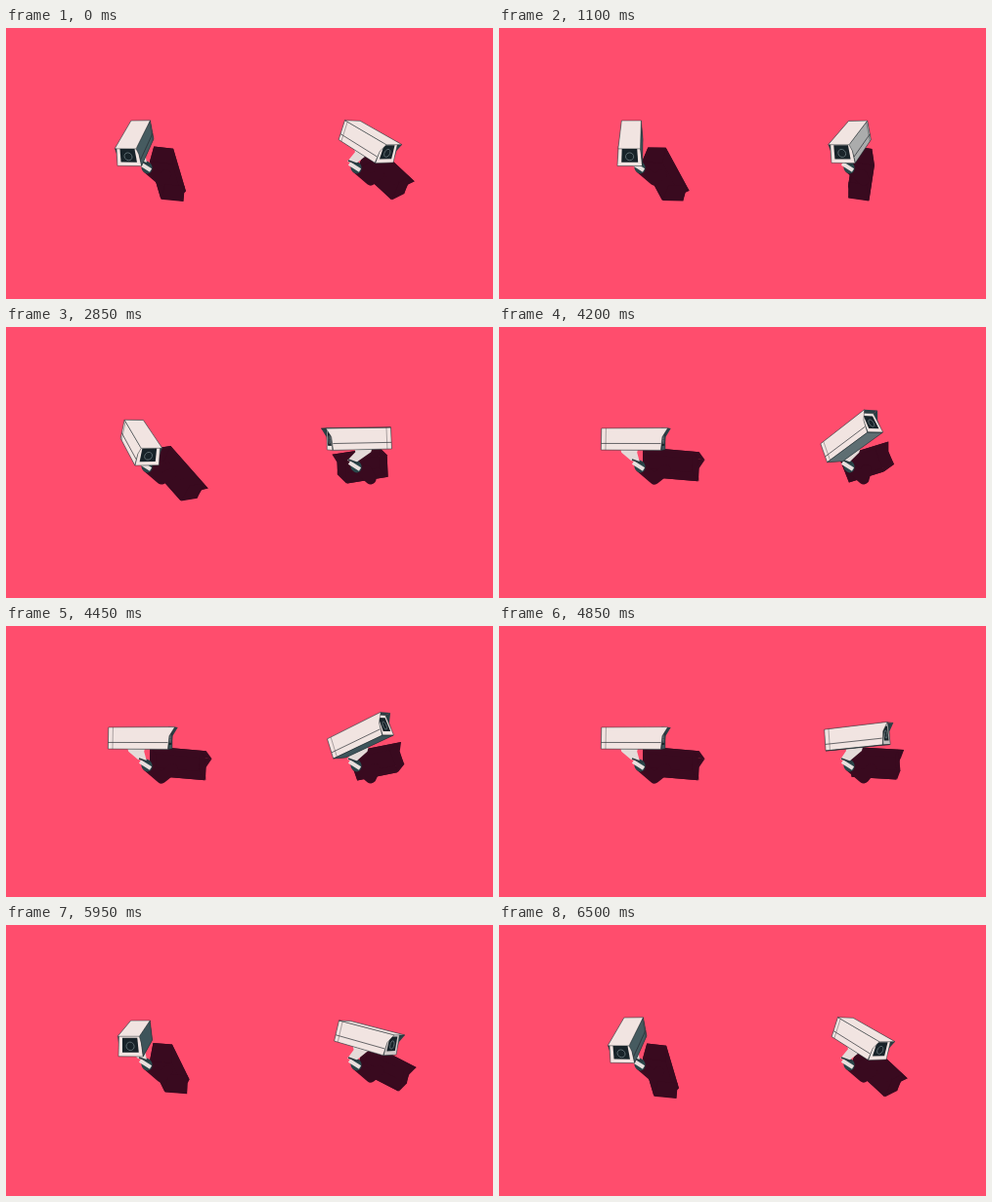
These frames come from a looping animation (498x278 px, 6550 ms). An HTML page with a canvas:

```html
<!DOCTYPE html>
<html>
<head>
<meta charset="utf-8">
<style>
html, body { margin: 0; height: 100%; overflow: hidden; background: #ff4d6d; }
canvas { display: block; }
</style>
</head>
<body>
<canvas id="stage" width="498" height="278"></canvas>
<script>
const ctx = document.getElementById('stage').getContext('2d');
const LOOP = 6550;
const HALF = { f: 34, r: 12.3, d: 11 };   // half length, width, height

// keys: time, centre x, centre y, yaw (+ right), pitch (+ down), in degrees
const cameras = [
  {
    base: [143, 143], sun: [0.54, 0.45],
    keys: [
      [0, 131.5, 118.5, -14.5, 26], [1100, 134.5, 118.5, -2, 26],
      [2850, 138, 119, 17, 26], [4200, 140.5, 115, 78, 0],
      [4850, 140.5, 115, 78, 0], [5400, 134, 114, 0, 2],
      [6500, 131.5, 118.5, -14.5, 26]
    ]
  },
  {
    base: [357, 143], sun: [0.19, 0.47],
    keys: [
      [0, 372, 117, 42, 22], [1100, 359, 117, -18, 22],
      [2850, 358, 114.5, -74, 1], [4200, 361.5, 112.5, 50, -30],
      [4850, 369, 113.5, 70, -6], [5400, 370.5, 114.5, 72, 0],
      [6500, 372, 117, 42, 22]
    ]
  }
];

// Monotone cubic through the keys
function poseAt(keys, time) {
  const last = keys.length - 1;
  if (time >= keys[last][0]) return keys[last].slice(1);
  const i = keys.findIndex(k => k[0] > time) - 1;
  const [a, b] = [keys[i], keys[i + 1]];
  const span = b[0] - a[0], u = (time - a[0]) / span;
  return [1, 2, 3, 4].map(c => {
    const slope = j => j < 0 || j >= last ? 0
      : (keys[j + 1][c] - keys[j][c]) / (keys[j + 1][0] - keys[j][0]);
    const tangent = j => {
      const p = slope(j - 1), q = slope(j);
      return p * q > 0 ? 2 * p * q / (p + q) : 0;
    };
    const ease = u * u * (3 - 2 * u);
    return a[c] + (b[c] - a[c]) * ease
      + span * (tangent(i) * u * (1 - u) ** 2 - tangent(i + 1) * u * u * (1 - u));
  });
}

function trace(points, closed = true) {
  ctx.beginPath();
  points.forEach(([x, y]) => ctx.lineTo(x, y));
  if (closed) ctx.closePath();
}

function fill(points, color, edge) {
  trace(points);
  ctx.fillStyle = color;
  ctx.fill();
  if (edge) line(points, edge, 0.8, true);
}

function line(points, color, width, closed = false) {
  trace(points, closed);
  ctx.strokeStyle = color;
  ctx.lineWidth = width;
  ctx.stroke();
}

function shade(light) {
  const t = Math.min(1, Math.max(0, (light + 0.25) / 0.6));
  const mix = (dark, bright) => Math.round(dark + (bright - dark) * t);
  return `rgb(${mix(62, 241)},${mix(84, 228)},${mix(90, 225)})`;
}

// Face outlines in box units: [along axis, across, down]
const side = r => [[-1, r, -1], [1, r, -1], [0.84, r, -0.2], [0.8, r, 1], [-1, r, 1]];
const slab = (d, front) => [[-1, -1, d], [front, -1, d], [front, 1, d], [-1, 1, d]];
const panel = (f, r, top, bottom) => [[f, -r, top], [f, r, top], [f, r, bottom], [f, -r, bottom]];
const ring = Array.from({ length: 16 }, (_, i) =>
  [0.82, 0.34 * Math.cos(i * Math.PI / 8), 0.05 + 0.38 * Math.sin(i * Math.PI / 8)]);

function drawCamera({ base, sun, keys }, time) {
  const [cx, cy, yawDeg, pitchDeg] = poseAt(keys, time);
  const yaw = yawDeg * Math.PI / 180, pitch = pitchDeg * Math.PI / 180;
  const [sa, ca, sp, cp] = [Math.sin(yaw), Math.cos(yaw), Math.sin(pitch), Math.cos(pitch)];
  const F = [sa * cp, sp, ca * cp], R = [ca, 0, -sa], D = [-sa * sp, cp, -ca * sp];
  const gap = 54 + 8 * F[2];   // distance from the wall; the body sits ahead of its pivot

  const turn = ([f, r, d]) => F.map((_, i) =>
    F[i] * f * HALF.f + R[i] * r * HALF.r * (0.93 + 0.07 * d) + D[i] * d * HALF.d);
  const view = p => {
    const [x, y, z] = turn(p), s = 1 + z / 500;
    return [cx + x * s, cy + y * s];
  };
  // The shadow is a little shorter at the back and narrower than the body
  const cast = ([f, r, d]) => {
    const [x, y, z] = turn([Math.max(f, -0.55), r * 0.85, d]);
    return [cx + x + (z + gap) * sun[0], cy + y + (z + gap) * sun[1]];
  };
  const light = n => (-n[0] * sun[0] - n[1] * sun[1] + n[2]) / Math.hypot(...sun, 1);
  const flip = n => n.map(v => -v);

  // Shadow on the wall
  const dark = '#390a1f';
  const [bx, by] = base;
  [side(-1), side(1), slab(-1, 1), slab(1, 0.8), panel(0.82, 1, -1, 1), panel(-1, 1, -1, 1)]
    .forEach(face => fill(face.map(cast), dark));
  ctx.lineCap = ctx.lineJoin = 'round';
  line([[bx + 2, by + 1], [bx + 16, by + 13], cast([0, 0, 0.6])], dark, 11);

  // Wall mount and tapered bracket
  ctx.beginPath();
  ctx.ellipse(bx + 1, by, 5.5, 6.5, -0.4, 0, 7);
  ctx.fillStyle = '#29464a';
  ctx.fill();
  const [fx, fy] = view([-0.22, 0, 0.9]);
  fill([[fx - 9, fy], [fx + 9, fy], [fx + 8, fy + 4], [bx + 1, by - 4], [bx - 8, by - 6], [fx - 8, fy + 4]],
    '#e4dad8');
  ctx.lineCap = 'butt';
  line([[bx - 6, by - 4], [bx + 5, by + 3]], '#e9dfdd', 4);
  line([[bx - 7, by - 7], [bx + 4, by - 3]], '#29383d', 1.5);

  // Body: inner hood first, then lens panel, then visible shells
  const edge = 'rgba(28,38,43,.6)';
  const shells = [
    [side(-1), flip(R)], [side(1), R],
    [slab(-1, 1), flip(D)], [slab(1, 0.8), D],
    [panel(-1, 1, -1, 1), flip(F)]
  ];
  shells.filter(s => s[1][2] <= 0).forEach(([face]) => fill(face.map(view), '#2b4045'));
  if (F[2] > 0) {
    fill(panel(0.82, 1, -1, 1).map(view), shade(light(F)), edge);
    fill(panel(0.82, 0.68, -0.72, 0.62).map(view), '#182329');
    line(ring.map(view), '#5d6b70', 1, true);
  }
  shells.filter(s => s[1][2] > 0.001)
    .forEach(([face, n]) => fill(face.map(view), shade(light(n)), edge));

  const r = R[2] > 0 ? 1 : -1;
  if (Math.abs(R[2]) > 0.2) {
    line([[-1, r, 0.4], [0.8, r, 0.4]].map(view), 'rgba(35,40,45,.75)', 0.9);
    line([[-0.86, r, -1], [-0.86, r, 1]].map(view), 'rgba(60,55,60,.5)', 0.8);
  }
}

function frame(now) {
  const time = now % LOOP;
  ctx.fillStyle = '#ff4d6d';
  ctx.fillRect(0, 0, 498, 278);
  cameras.forEach(camera => drawCamera(camera, time));
  requestAnimationFrame(frame);
}
requestAnimationFrame(frame);
</script>
</body>
</html>
```
